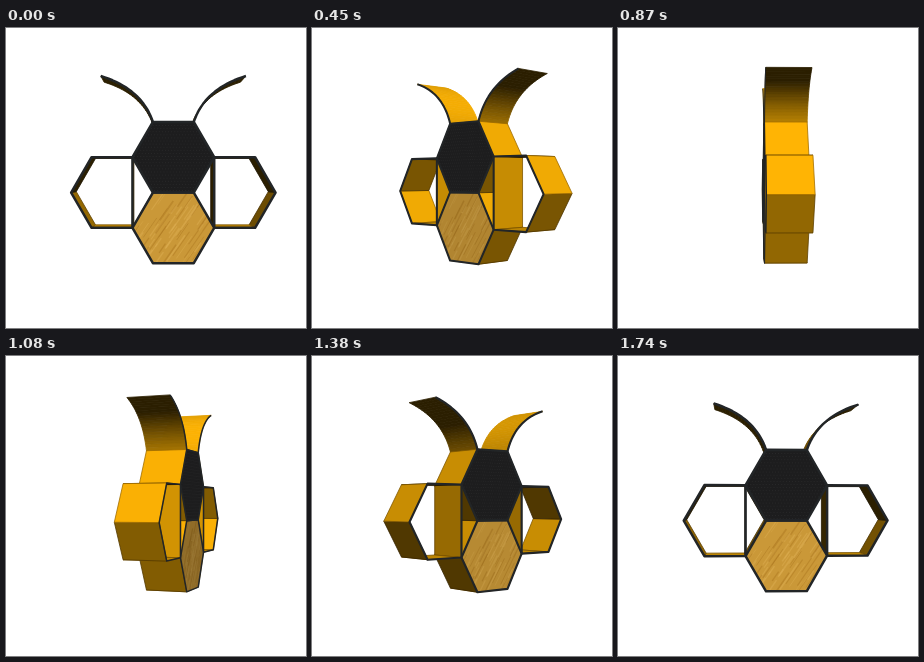
An HTML page with a canvas for the animation above (1.77 s loop, 300 px wide and 300 px high).

```html
<!DOCTYPE html>
<html>
<head>
<meta charset="utf-8">
<style>
html, body { margin: 0; width: 100%; height: 100%; overflow: hidden; background: #fff; }
canvas { display: block; width: 300px; height: 300px; }
</style>
</head>
<body>
<canvas id="stage" width="300" height="300"></canvas>
<script>
const ctx = document.getElementById('stage').getContext('2d');
const LOOP = 1770, STEP = 30;
const F = 660, AXIS = 16.8, DEPTH = 20.7;   // camera distance, pivot offset, half depth
const A = 39.6, K = 34.2, MID = 14.1;       // hexagon side, half height, centre row
const LIGHT = [0.12, -0.6, 0.79];
const row = n => MID + n * K;

let cos = 1, sin = 0;

function project(x, y, z) {
  const s = F / (F - (z * cos + x * sin));
  return [150 + (x * cos - z * sin + AXIS) * s, 150 + y * s];
}

function trace(points, close) {
  ctx.beginPath();
  points.forEach((p, i) => i ? ctx.lineTo(p[0], p[1]) : ctx.moveTo(p[0], p[1]));
  if (close) ctx.closePath();
}

const onFace = pts => pts.map(p => project(p[0], p[1], DEPTH));
const mirror = pts => pts.map(p => [-p[0], p[1]]);

const hexagon = n => [
  [-A / 2, row(n - 1)], [A / 2, row(n - 1)], [A, row(n)],
  [A / 2, row(n + 1)], [-A / 2, row(n + 1)], [-A, row(n)]
];

function antenna() {
  const p0 = [70.3, -98.8], p1 = [30.5, -86.5], p2 = [A / 2, row(-2)], n = 20;
  return Array.from({ length: n + 1 }, (_, i) => {
    const t = i / n, u = 1 - t;
    return [0, 1].map(k => u * u * p0[k] + 2 * u * t * p1[k] + t * t * p2[k]);
  });
}

const head = hexagon(-1), tail = hexagon(1);
const wing = [[A, row(-1)], [2 * A, row(-1)], [2.5 * A, row(0)], [2 * A, row(1)], [A, row(1)], [A, row(-1)]];
const feeler = antenna();
const side = [[A / 2, row(-2)], [A, row(-1)], [A / 2, row(0)], [A, row(1)], [A / 2, row(2)]];

const walls = [];
function addWalls(path, smooth) {
  for (let i = 1; i < path.length; i++) walls.push({ a: path[i - 1], b: path[i], smooth });
}
for (const flip of [p => p, mirror]) {
  addWalls(flip(side));
  addWalls(flip(wing));
  addWalls(flip(feeler), true);
}
addWalls([head[0], head[1]]);
addWalls([tail[3], tail[4]]);

// wood grain, fixed by a seed
let seed = 11;
const rnd = () => (seed = (seed * 16807) % 2147483647) / 2147483647;
const grain = Array.from({ length: 90 }, () => {
  const x = (rnd() * 2 - 1) * 48, y = row(1) + (rnd() * 2 - 1) * K;
  const len = 5 + rnd() * 13;
  return { a: [x - len * 0.5, y + len * 0.72], b: [x + len * 0.5, y - len * 0.72], dark: rnd() < 0.5, w: 0.6 + rnd() * 1.2 };
});

function drawWall(w, camX) {
  const { a, b } = w;
  const dx = b[0] - a[0], dy = b[1] - a[1], len = Math.hypot(dx, dy);
  let nx = -dy / len, ny = dx / len;
  const mx = (a[0] + b[0]) / 2, my = (a[1] + b[1]) / 2;
  if (nx * (camX - mx) - ny * my < 0) { nx = -nx; ny = -ny; }
  const lit = nx * cos * LIGHT[0] + ny * LIGHT[1] + nx * sin * LIGHT[2];
  const c = Math.min(1, Math.max(0.17, 0.27 + 0.78 * lit));
  const fill = `rgb(${255 * c},${180 * c},${4 * c})`;
  trace([project(...a, DEPTH), project(...b, DEPTH), project(...b, -DEPTH), project(...a, -DEPTH)], true);
  ctx.fillStyle = fill;
  ctx.fill();
  ctx.lineWidth = 0.8;
  ctx.strokeStyle = w.smooth ? fill : `rgb(${165 * c},${112 * c},0)`;
  ctx.stroke();
}

function drawPanels() {
  const shade = 0.5 + 0.5 * Math.pow(cos, 0.8);
  const rgb = (r, g, b) => `rgb(${r * shade},${g * shade},${b * shade})`;

  trace(onFace(head), true);
  ctx.fillStyle = '#1d1d1e';
  ctx.fill();
  ctx.save();
  ctx.clip();
  ctx.fillStyle = 'rgba(70,70,72,0.3)';
  for (let j = 0; j < 24; j++) {
    for (let i = 0; i < 28; i++) {
      const p = project(-A + i * 3 + (j % 2) * 1.5, row(-2) + j * 3, DEPTH);
      ctx.fillRect(p[0], p[1], cos, 1);
    }
  }
  ctx.restore();

  trace(onFace(tail), true);
  ctx.fillStyle = rgb(202, 152, 56);
  ctx.fill();
  ctx.save();
  ctx.clip();
  ctx.globalAlpha = 0.45;
  for (const g of grain) {
    trace(onFace([g.a, g.b]));
    ctx.lineWidth = g.w * (0.4 + 0.6 * cos);
    ctx.strokeStyle = g.dark ? rgb(168, 116, 30) : rgb(222, 176, 84);
    ctx.stroke();
  }
  ctx.restore();
}

function drawRims() {
  ctx.strokeStyle = '#222527';
  ctx.lineWidth = 1 + 1.5 * cos;
  for (const path of [head, tail, wing, mirror(wing), feeler, mirror(feeler)]) {
    trace(onFace(path), path === head || path === tail);
    ctx.stroke();
  }
}

function draw(ms) {
  // both faces look alike, so half a turn closes the loop
  let turn = Math.floor((ms % LOOP) / STEP) * STEP / LOOP * Math.PI;
  if (turn > Math.PI / 2) turn -= Math.PI;
  cos = Math.cos(turn);
  sin = Math.sin(turn);
  const camX = F * sin - AXIS * cos, camZ = F * cos + AXIS * sin;

  ctx.fillStyle = '#fff';
  ctx.fillRect(0, 0, 300, 300);
  ctx.lineJoin = 'round';

  const dist = w => Math.hypot((w.a[0] + w.b[0]) / 2 - camX, (w.a[1] + w.b[1]) / 2);
  walls.slice().sort((p, q) => dist(q) - dist(p)).forEach(w => drawWall(w, camX));

  if (camZ > DEPTH) {
    drawPanels();
    drawRims();
  }
}

const start = performance.now();
function tick() {
  draw(performance.now() - start);
  requestAnimationFrame(tick);
}
tick();
</script>
</body>
</html>
```
